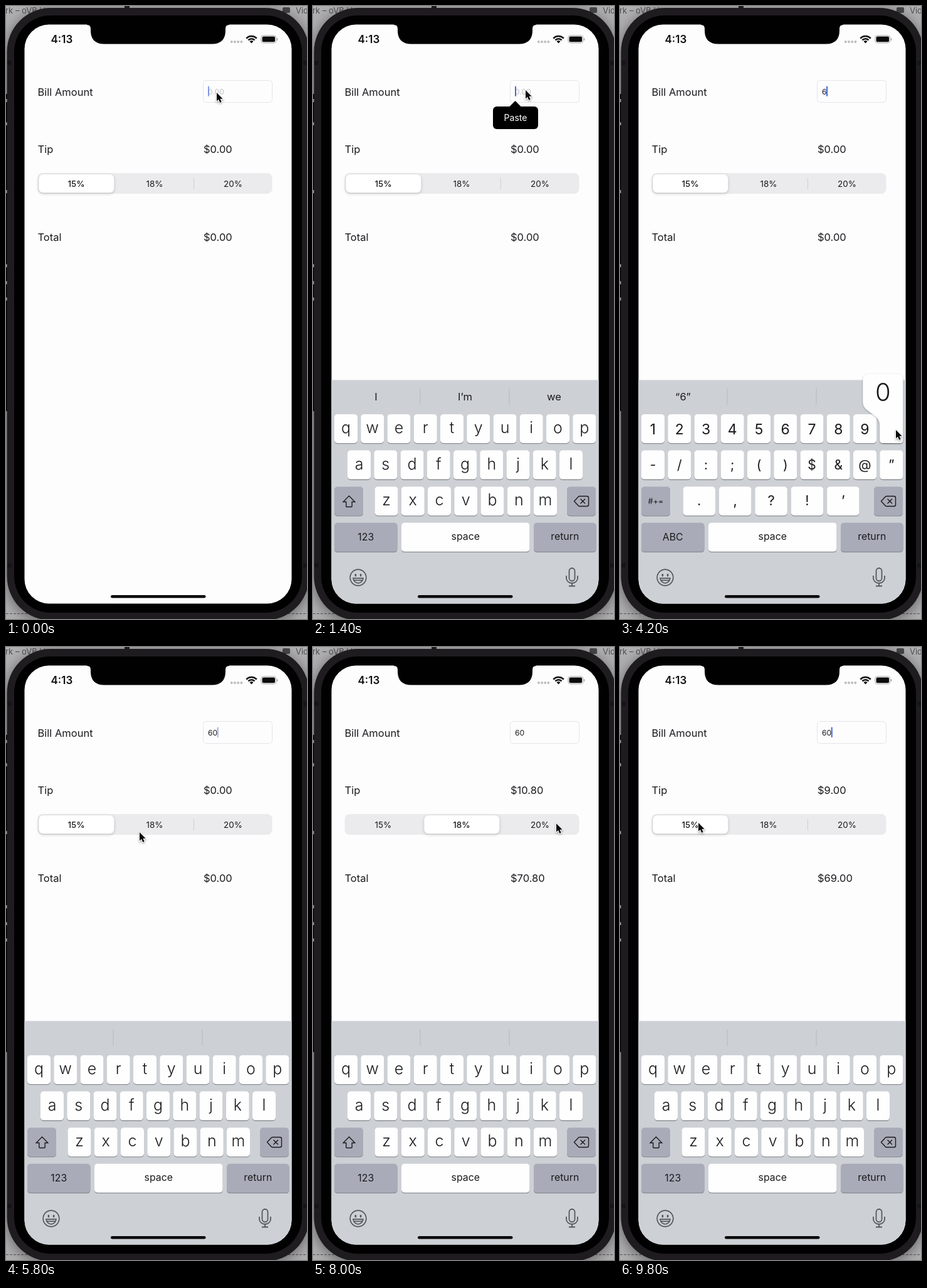
An HTML page with a canvas that plays this animation: 480x976 px, repeating every 9.9 s.

```html
<!DOCTYPE html>
<html lang="en">
<head>
<meta charset="utf-8">
<title>Tip calculator</title>
<style>
html, body { margin: 0; height: 100%; overflow: hidden; background: #b0afb1; }
canvas { display: block; }
</style>
</head>
<body>
<canvas id="stage" width="480" height="976"></canvas>
<script>
const c = document.getElementById('stage').getContext('2d');
const LOOP = 9900, STEP = 100;
const INK = '#1b1a1d', KEY = '#fefefe', DARK_KEY = '#a9acb8', BOARD = '#cdd1d6', ICON = '#55585d';

// Moments of the interaction, in ms
const BOARD_UP = 560, PASTE = 1300, NUMBERS = 2200, SIX = 3500, ZERO = 4100, RETURN = 5200;
const TAPS = [[0, 0], [6900, 1], [8200, 2], [9550, 0]];
const RATES = [15, 18, 20];

// Pointer path: time, x, y
const PATH = [
  [0, 336, 138], [300, 339, 134], [1600, 339, 134], [2100, 86, 842], [2250, 86, 842],
  [2500, 255, 697], [2800, 261, 680], [3000, 261, 680], [3200, 262, 679], [3500, 262, 679],
  [3800, 427, 676], [3950, 427, 676], [4100, 440, 675], [4300, 440, 675], [4900, 417, 838],
  [5000, 418, 840], [5300, 418, 840], [5800, 213, 295], [6100, 232, 285], [7200, 232, 285],
  [7600, 330, 283], [7750, 330, 283], [8000, 388, 281], [8800, 388, 281], [9500, 125, 280],
  [LOOP, 125, 280]
];

const clamp = v => Math.min(1, Math.max(0, v));
const smooth = p => p * p * (3 - 2 * p);
const easeOut = p => 1 - (1 - p) ** 3;

function box(x, y, w, h, r, fill) {
  c.beginPath();
  c.roundRect(x, y, w, h, r);
  c.fillStyle = fill;
  c.fill();
}

function text(s, x, y, size, { color = INK, weight = 400, align = 'left' } = {}) {
  c.font = `${weight} ${size}px Inter, sans-serif`;
  c.fillStyle = color;
  c.textAlign = align;
  c.fillText(s, x, y);
}

function centered(s, x, y, size, options) {
  text(s, x, y, size, { ...options, align: 'center' });
}

function shape(d, { fill, stroke, width = 1.4 }) {
  const path = new Path2D(d);
  if (fill) { c.fillStyle = fill; c.fill(path); }
  if (stroke) { c.strokeStyle = stroke; c.lineWidth = width; c.stroke(path); }
}

function shadow(color, blur, dy) {
  c.shadowColor = color;
  c.shadowBlur = blur;
  c.shadowOffsetY = dy;
}

function at(x, y, draw) {
  c.save();
  c.translate(x, y);
  draw();
  c.restore();
}

function desktop() {
  box(0, 0, 480, 976, 0, '#b0afb1');
  text('rk – oVB U', -1, 12, 13, { color: '#504f52' });
  text('Vid', 462, 12, 13, { color: '#504f52' });
  box(441, 2, 12, 9, 2, '#49484b');
  box(189, 0, 8, 3, 0, '#222');
  box(0, 140, 4, 505, 0, '#080808');
  for (const y of [148, 185, 293, 411, 438, 464]) box(0, y, 2, 5, 0, '#c9c9c9');
  c.setLineDash([4, 2]);
  shape('M0 967.5H480', { stroke: '#565558', width: 1 });
  c.setLineDash([]);
}

function phone() {
  c.save();
  shadow('rgba(0,0,0,.45)', 22, 4);
  box(1.5, 3, 482, 975, 70, '#1f1c20');
  c.restore();
  for (const y of [87, 887]) {
    box(2, y, 7, 7, 0, '#161417');
    box(474, y, 6, 7, 0, '#161417');
  }
  box(13, 15, 459, 951, 58, '#020102');
  box(29.5, 29.5, 426, 922, 39, '#fefdfe');
}

function statusBar() {
  shape('M129 29V30Q135 30 135 36V39Q135 60.5 157 60.5H328Q350 60.5 350 39V36Q350 30 356 30V29Z', { fill: '#020102' });
  text('4:13', 71.5, 59, 17, { weight: 600, color: '#111' });
  for (let i = 0; i < 4; i++) box(357.8 + i * 5.2, 55, 4, 4, 2, '#bdbcbf');
  c.lineCap = 'butt';
  for (const r of [11.2, 7]) {
    c.beginPath();
    c.arc(391.5, 59.2, r, -Math.PI * 0.76, -Math.PI * 0.24);
    c.strokeStyle = '#111';
    c.lineWidth = 2.5;
    c.stroke();
  }
  shape('M391.5 59.5L388.5 56.3Q391.5 53.7 394.5 56.3Z', { fill: '#111' });
  c.beginPath();
  c.roundRect(406.8, 46.9, 24, 12, 3.6);
  c.strokeStyle = '#aaa9ac';
  c.lineWidth = 1;
  c.stroke();
  box(408.5, 48.5, 20.6, 8.8, 2, '#0c0c0c');
  box(431.8, 51, 1.6, 4, 1, '#aaa9ac');
}

function caretAlpha(t) {
  if (t >= SIX && t < 4600) return 1;
  const start = t < PASTE ? 30 : t < SIX ? 2700 : 5800;
  const period = 1030, fade = 220, dark = 460;
  const p = ((t - start + fade / 2) % period + period) % period;
  return 1 - clamp(p / fade) + clamp((p - dark) / fade);
}

function form(t) {
  const tap = TAPS.findLast(([time]) => t >= time);
  const picked = tap[1];
  const previous = TAPS[Math.max(0, TAPS.indexOf(tap) - 1)][1];
  const tip = t < TAPS[1][0] ? 0 : 60 * RATES[picked] / 100;
  const total = tip ? 60 + tip : 0;

  text('Bill Amount', 50.5, 143, 16.5);
  text('Tip', 50.5, 234, 16.5);
  text('$' + tip.toFixed(2), 315, 234, 16.5);
  text('Total', 50.5, 374, 16.5);
  text('$' + total.toFixed(2), 315, 374, 16.5);

  c.beginPath();
  c.roundRect(314.5, 118.5, 110, 35, 5);
  c.strokeStyle = '#e5e3e8';
  c.lineWidth = 1;
  c.stroke();
  const typed = t < SIX ? '' : t < ZERO + 200 ? '6' : '60';
  text(typed || '0.00', 322, 140.5, 12.2, { color: typed ? INK : '#c2c1c5' });
  c.globalAlpha = caretAlpha(t);
  box(322 + (typed ? c.measureText(typed).width - 0.5 : 0), 127.5, 2, 16.5, 1, '#4467d9');
  c.globalAlpha = 1;

  box(50.5, 266, 374, 33, 8, '#ebeaec');
  if (picked === 0) box(299, 274, 1, 18, 0, '#cfced2');
  if (picked === 2) box(174.5, 274, 1, 18, 0, '#cfced2');
  const slide = previous + (picked - previous) * easeOut(clamp((t - tap[0]) / 250));
  c.save();
  shadow('rgba(0,0,0,.2)', 5, 1.5);
  box(52.3 + slide * 125, 268, 120, 29.3, 7, '#fff');
  c.restore();
  RATES.forEach((rate, i) =>
    centered(rate + '%', 112 + i * 125, 288, 13.5, { weight: i === picked ? 500 : 400 }));

  if (t >= PASTE && t < SIX) {
    shape('M313 160.5L322.5 151L332 160.5Z', { fill: '#000' });
    box(287, 160, 72, 36, 6, '#000');
    centered('Paste', 323, 183, 14, { color: '#fff' });
  }
}

function key(x, y, w, label, { size = 25, weight = 300, fill = KEY, drop = 30 } = {}) {
  box(x, y + 1.3, w, 46, 5, '#8b8e94');
  box(x, y, w, 46, 5, fill);
  if (label) centered(label, x + w / 2, y + drop, size, { weight });
}

function row(labels, x, y, w, pitch, style) {
  [...labels].forEach((label, i) => key(x + i * pitch, y, w, label, style));
}

// Enlarged key cap above a pressed key; edge keys lean left
function bubble(label, x, atEdge) {
  const left = atEdge ? x - 27 : x - 13;
  const right = atEdge ? x + 37 : x + 50;
  const d = `M${left + 9} 586H${right - 9}Q${right} 586 ${right} 595V628Q${right} 635 ${atEdge ? right : right - 5} 640`
    + `Q${x + 37} 648 ${x + 37} 658V691Q${x + 37} 696 ${x + 32} 696H${x + 5}Q${x} 696 ${x} 691V668`
    + `Q${x} 660 ${x - 6} 654L${left + 5} 642Q${left} 637 ${left} 630V595Q${left} 586 ${left + 9} 586Z`;
  c.save();
  shadow('rgba(0,0,0,.28)', 3, 1);
  shape(d, { fill: '#fefefe' });
  c.restore();
  centered(label, (left + right) / 2, 629, 40, { weight: 300 });
}

function boardIcons() {
  at(72, 910, () => {
    c.beginPath();
    c.arc(0, 0, 12.8, 0, 7);
    c.strokeStyle = ICON;
    c.lineWidth = 1.7;
    c.stroke();
    box(-5.4, -6, 2.6, 4.4, 1.3, ICON);
    box(2.8, -6, 2.6, 4.4, 1.3, ICON);
    shape('M-8 1.2H8Q6.5 8.8 0 8.8T-8 1.2ZM-7 4.4H7', { stroke: ICON, width: 1.7 });
  });
  at(413, 909, () =>
    shape('M-4.5 -9.5A4.5 4.5 0 0 1 4.5 -9.5V2A4.5 4.5 0 0 1 -4.5 2ZM-9 -2V2A9 8 0 0 0 9 2V-2M0 10V14.5M-5 14.5H5',
      { stroke: ICON, width: 1.8 }));
}

function keyboard(t) {
  if (t < BOARD_UP) return;
  const numeric = t >= NUMBERS && t < RETURN;
  const pressed = start => t >= start && t < start + 100;
  box(29, 595.5, 427, 357, 0, BOARD);
  for (const x of [170.5, 312.5]) box(x, 609, 1, 26, 0, '#b6babf');

  const hints = t < SIX ? ['I', 'I’m', 'we']
    : t < ZERO + 200 ? ['“6”'] : t < RETURN ? ['“60”'] : [];
  hints.forEach((hint, i) => centered(hint, 100.5 + i * 142, 628, 16.5));

  const pitch = 42.25;
  const [y1, y2, y3, y4] = [0, 1, 2, 3].map(i => 650 + i * 57.6);
  if (numeric) {
    const digits = { size: 23, weight: 400, drop: 31.5 };
    row('1234567890', 34, y1, 37, pitch, digits);
    row('-/:;()$&@”', 34, y2, 37, pitch, { ...digits, size: 21, drop: 30 });
    row('.,?!’', 100.5, y3, 51.5, 57.4, { ...digits, size: 22, drop: 30 });
  } else {
    row('qwertyuiop', 34, y1, 37, pitch);
    row('asdfghjkl', 55, y2, 37, pitch);
    row('zxcvbnm', 98.5, y3, 37, pitch);
  }
  const side = { fill: DARK_KEY, size: 12.5, weight: 400, drop: 28 };
  const wide = { size: 15.8, weight: 400, drop: 28 };
  key(34, y3, 46, numeric ? '#+=' : '', side);
  if (!numeric) {
    at(57.5, 789, () =>
      shape('M0 -9L9.3 .5H4.7V7.5Q4.7 8.5 3.7 8.5H-3.7Q-4.7 8.5 -4.7 7.5V.5H-9.3Z', { stroke: INK }));
  }
  key(405, y3, 46, '', side);
  at(428, 788.5, () =>
    shape('M-11.5 0L-5 -7Q-4 -8 -3 -8H9Q11.5 -8 11.5 -5.5V5.5Q11.5 8 9 8H-3Q-4 8 -5 7ZM-1.5 -3.7L6 3.7M6 -3.7L-1.5 3.7',
      { stroke: INK }));
  key(34, y4, 100.5, numeric ? 'ABC' : '123', { ...wide, fill: pressed(NUMBERS - 100) ? KEY : DARK_KEY });
  key(141, y4, 204.5, 'space', { ...wide, drop: 27 });
  key(352, y4, 99.5, 'return', { ...wide, drop: 27, fill: pressed(RETURN) ? KEY : DARK_KEY });
  boardIcons();

  if (pressed(SIX)) bubble('6', 34 + 5 * pitch, false);
  if (t >= ZERO && t < ZERO + 200) bubble('0', 34 + 9 * pitch, true);
}

function pointer(t) {
  const i = Math.max(1, PATH.findIndex(([time]) => time > t));
  const [t0, x0, y0] = PATH[i - 1], [t1, x1, y1] = PATH[i];
  const p = smooth((t - t0) / (t1 - t0));
  at(x0 + (x1 - x0) * p, y0 + (y1 - y0) * p, () => {
    const arrow = 'M0 0V13.4L3 10.7L5.2 15.8L7.7 14.7L5.5 9.7H9.7Z';
    shadow('rgba(0,0,0,.35)', 3, 1.5);
    shape(arrow, { stroke: '#fff', width: 2 });
    shadow('transparent', 0, 0);
    shape(arrow, { fill: '#080808' });
  });
}

function draw(t) {
  desktop();
  phone();
  form(t);
  c.save();
  c.beginPath();
  c.roundRect(29.5, 29.5, 426, 922, 39);
  c.clip();
  c.translate(0, 357 * (1 - easeOut(clamp((t - BOARD_UP) / 450))));
  keyboard(t);
  c.restore();
  statusBar();
  box(167, 938, 151.5, 4.6, 2.3, '#050505');
  pointer(t);
}

const start = performance.now();
function tick() {
  const elapsed = performance.now() - start + 15;
  draw(Math.floor(elapsed / STEP) * STEP % LOOP);
  requestAnimationFrame(tick);
}
tick();
</script>
</body>
</html>
```
